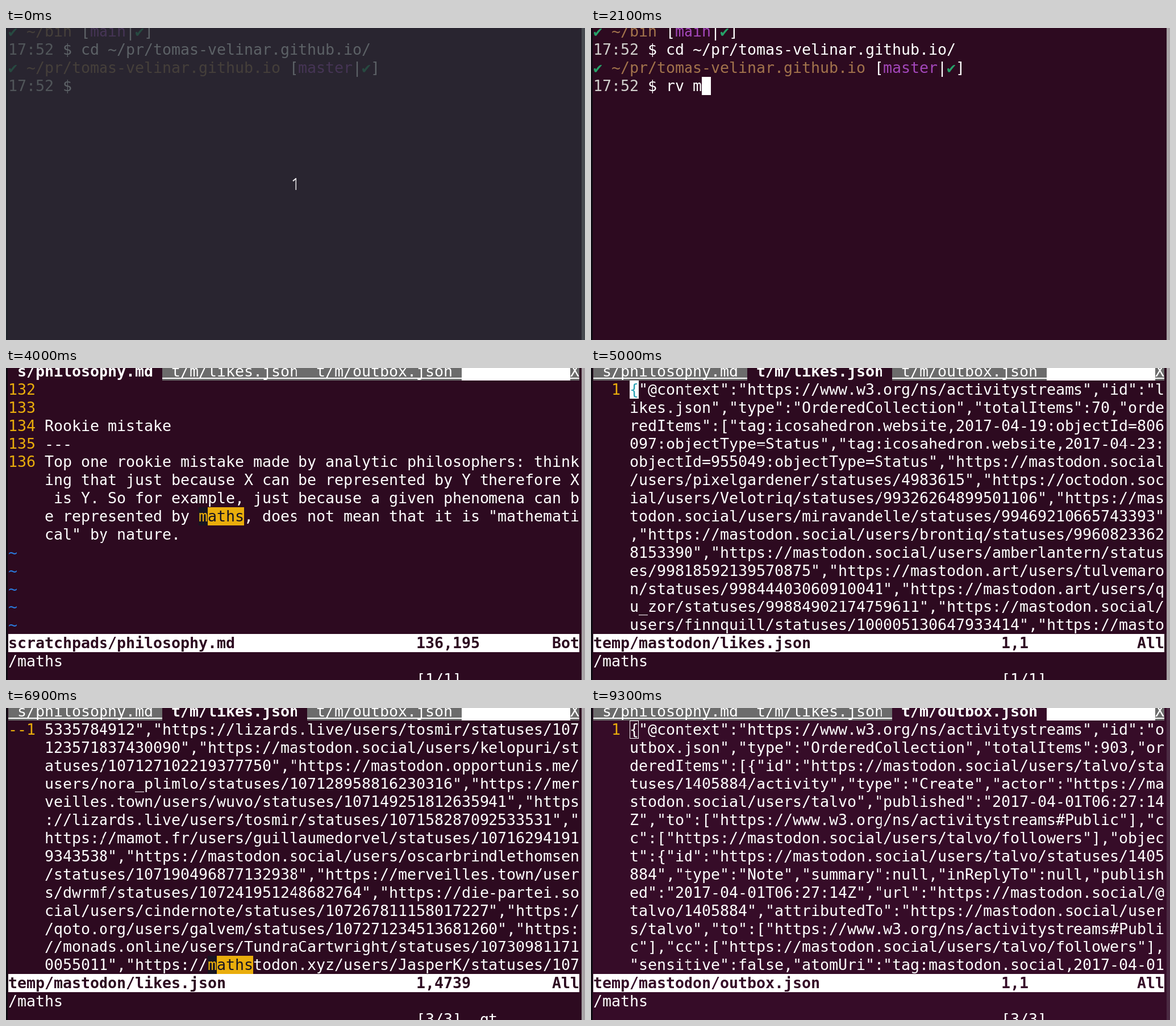
These frames come from a looping animation (1019 by 549 pixels, 9400 ms). An HTML page with a canvas:

```html
<!DOCTYPE html>
<html lang="en">
<head>
<meta charset="utf-8">
<title>Terminal search</title>
<style>
  html, body { margin: 0; width: 100%; height: 100%; overflow: hidden; background: #2d0a20; }
  canvas { display: block; width: 1019px; height: 549px; image-rendering: pixelated; }
</style>
</head>
<body>
<canvas id="screen" width="1022" height="551"></canvas>
<script>
const LOOP = 9400;
// Cell grid of the terminal; the page shows it slightly scaled down
const CELL_W = 16, CELL_H = 32, LEFT = 4, TOP = -10, BASELINE = 25, WRAP = 59;
const FONT = '26.667px "DejaVu Sans Mono", "DejaVu Sans", monospace';

const focused = { bg: "#2d0a20", bar: "#a8a3a6" };
const unfocused = { bg: "#360c28", bar: "#4a2a42" };

// A style without fg takes the background colour for its text
const styles = {
  text: { fg: "#fff" },
  time: { fg: "#d0cfcc" },
  path: { fg: "#a2734c" },
  branch: { fg: "#a347ba" },
  ok: { fg: "#26a269" },
  num: { fg: "#e9ad0c" },
  tilde: { fg: "#2a7bde" },
  hit: { fg: "#171421", bg: "#e9ad0c" },
  hitCursor: { fg: "#e9ad0c", bg: "#171421" },
  cursor: { bg: "#fff" },
  brace: { fg: "#2aa1b3", bg: "#fff" },
  hollow: { fg: "#fff", box: true },
  active: { fg: "#fff", bold: true },
  tab: { fg: "#fff", bg: "#6c6c6c", underline: true },
  fill: { bg: "#fff" },
  status: { bg: "#fff", bold: true },
};

// A screen is a list of rows; a row is a list of plain strings and [style, text] pairs
const lines = text => text.trim().split("\n");

// Shell
const site = "~/pr/tomas-velinar.github.io";
const cursor = ["cursor", " "];
const prompt = (path, branch) =>
  [["ok", "✔"], " ", ["path", path], " [", ["branch", branch], "|", ["ok", "✔"], "]"];
const command = (...parts) => [["time", "17:52"], " $ ", ...parts];
const shell = (...parts) =>
  [prompt("~/bin", "main"), command(`cd ${site}/`), prompt(site, "master"), command(...parts)];

// Editor
const tabs = ["s/philosophy.md", "t/m/likes.json", "t/m/outbox.json"];
const files = ["scratchpads/philosophy.md", "temp/mastodon/likes.json", "temp/mastodon/outbox.json"];

function editor(file, body, pos, footer, search = "/maths") {
  const bar = tabs.map((name, i) => [i === file ? "active" : "tab", ` ${name} `]);
  const status = files[file].padEnd(45) + pos.padEnd(15) + (file ? "All" : "Bot");
  return [
    [...bar, ["fill", " ".repeat(12)], ["tab", "X"]], ...body,
    [["status", status]], [search], [" ".repeat(45) + footer],
  ];
}

const gutter = (label, ...parts) => [["num", label], " ", ...parts];

function mark(text, current) {
  const match = current ? [["hitCursor", "m"], ["hit", "aths"]] : [["hit", "maths"]];
  return text.split("maths").flatMap((part, i) => i ? [...match, part] : [part]);
}

const json = (rows, label, current) =>
  rows.map((r, i) => gutter(i ? "   " : label, ...mark(r, i === current)));

// Top of a file, with the cursor on its first character
const fileTop = (rows, style) => rows.map((r, i) =>
  i ? gutter("   ", r) : gutter("  1", [style, r[0]], r.slice(1)));

const note = lines(`
Top one rookie mistake made by analytic philosophers: think
ing that just because X can be represented by Y therefore X
 is Y. So for example, just because a given phenomena can b
e represented by maths, does not mean that it is "mathemati
cal" by nature.`);

function philosophy(found) {
  const text = note.map((t, i) => {
    if (found) return mark(t, true);
    return i ? [t] : [["cursor", t[0]], t.slice(1)];
  });
  return [
    gutter("132"), gutter("133"), gutter("134", "Rookie mistake"), gutter("135", "---"),
    ...text.map((parts, i) => gutter(i ? "   " : "136", ...parts)),
    ...Array(5).fill([["tilde", "~"]]),
  ];
}

const likesTop = lines(`
{"@context":"https://www.w3.org/ns/activitystreams","id":"l
ikes.json","type":"OrderedCollection","totalItems":70,"orde
redItems":["tag:icosahedron.website,2017-04-19:objectId=806
097:objectType=Status","tag:icosahedron.website,2017-04-23:
objectId=955049:objectType=Status","https://mastodon.social
/users/pixelgardener/statuses/4983615","https://octodon.soc
ial/users/Velotriq/statuses/99326264899501106","https://mas
todon.social/users/miravandelle/statuses/99469210665743393"
,"https://mastodon.social/users/brontiq/statuses/9960823362
8153390","https://mastodon.social/users/amberlantern/status
es/99818592139570875","https://mastodon.art/users/tulvemaro
n/statuses/99844403060910041","https://mastodon.art/users/q
u_zor/statuses/99884902174759611","https://mastodon.social/
users/finnquill/statuses/100005130647933414","https://masto`);

const likesMid = lines(`
ttps://piggo.space/objects/ae0387e2-7f1d-4922-a147-f49c6596
2530","https://mathstodon.xyz/users/BrunoTavish/statuses/10
5204619456993276","https://merveilles.town/users/oulivane/s
tatuses/105567436515174204","https://mastodon.art/users/Cyn
dovar/statuses/105803146321920708","https://merveilles.town
/users/morvenix/statuses/106116504560615213","https://ioc.e
xchange/users/dorvik/statuses/106562531009340054","https://
snabelen.no/users/pelto/statuses/106686575249177634","https
://merveilles.town/users/wuvo/statuses/106692930725647244",
"https://snabelen.no/users/pelto/statuses/10672007986868348
7","https://merveilles.town/users/jendorim/statuses/1068319
98079843077","https://monads.online/users/ferdinandkolvar/s
tatuses/106993542835199282","https://lizards.live/users/tos
mir/statuses/107021786010270525","https://mathstodon.xyz/us`);

const likesEnd = lines(`
5335784912","https://lizards.live/users/tosmir/statuses/107
123571837430090","https://mastodon.social/users/kelopuri/st
atuses/107127102219377750","https://mastodon.opportunis.me/
users/nora_plimlo/statuses/107128958816230316","https://mer
veilles.town/users/wuvo/statuses/107149251812635941","https
://lizards.live/users/tosmir/statuses/107158287092533531","
https://mamot.fr/users/guillaumedorvel/statuses/10716294191
9343538","https://mastodon.social/users/oscarbrindlethomsen
/statuses/107190496877132938","https://merveilles.town/user
s/dwrmf/statuses/107241951248682764","https://die-partei.so
cial/users/cindernote/statuses/107267811158017227","https:/
/qoto.org/users/galvem/statuses/107271234513681260","https:
//monads.online/users/TundraCartwright/statuses/10730981171
0055011","https://mathstodon.xyz/users/JasperK/statuses/107`);

const outbox = lines(`
{"@context":"https://www.w3.org/ns/activitystreams","id":"o
utbox.json","type":"OrderedCollection","totalItems":903,"or
deredItems":[{"id":"https://mastodon.social/users/talvo/sta
tuses/1405884/activity","type":"Create","actor":"https://ma
stodon.social/users/talvo","published":"2017-04-01T06:27:14
Z","to":["https://www.w3.org/ns/activitystreams#Public"],"c
c":["https://mastodon.social/users/talvo/followers"],"objec
t":{"id":"https://mastodon.social/users/talvo/statuses/1405
884","type":"Note","summary":null,"inReplyTo":null,"publish
ed":"2017-04-01T06:27:14Z","url":"https://mastodon.social/@
talvo/1405884","attributedTo":"https://mastodon.social/user
s/talvo","to":["https://www.w3.org/ns/activitystreams#Publi
c"],"cc":["https://mastodon.social/users/talvo/followers"],
"sensitive":false,"atomUri":"tag:mastodon.social,2017-04-01`);

// The stretch of likes that ends at the first match
function likesBefore() {
  let seed = 4211;
  const rand = n => (seed = seed * 16807 % 2147483647) % n;
  const pick = list => list[rand(list.length)];
  const digits = n => Array.from({ length: n }, () => rand(10)).join("");
  const hosts = ["mastodon.social", "octodon.social", "merveilles.town", "mastodon.art"];
  const users = ["pixelgardener", "oulivane", "finnquill", "wuvo", "amberlantern", "jendorim"];
  let text = "";
  for (let i = 0; i < 14; i++) {
    text += `"https://${pick(hosts)}/users/${pick(users)}/statuses/10${1 + (i >> 2)}${digits(15)}",`;
  }
  text = (text + '"h').slice(-12 * WRAP);
  const rows = Array.from({ length: 12 }, (_, i) => text.slice(i * WRAP, (i + 1) * WRAP));
  return [...rows, likesMid[0], likesMid[1]];
}

// Timeline: start in ms, screen, options
const typed = "rv maths";
const keys = [1100, 1400, 1700, 2100, 2200, 2500, 2600, 2800];
const found = philosophy(true);
const last = json(likesEnd, "--1", 13);
const scenes = [
  [0, shell(), { countdown: "1" }],
  [100, shell()],
  [600, shell(cursor)],
  ...keys.map((t, i) => [t, shell(typed.slice(0, i + 1), cursor)]),
  [3200, [...shell(typed), [cursor]]],
  [3300, [[cursor]]],
  [3400, editor(0, philosophy(false), "136,1", "", "")],
  [4000, editor(0, found, "136,195", "[1/1]")],
  [4900, editor(0, found, "136,195", "[1/1]  g")],
  [5000, editor(1, fileTop(likesTop, "brace"), "1,1", "[1/1]")],
  [5400, editor(1, json(likesBefore(), "--1", 13), "1,2848", "[1/3]")],
  [5900, editor(1, json(likesMid, "--1", 13), "1,3583", "[2/3]")],
  [6500, editor(1, last, "1,4739", "[3/3]")],
  [6800, editor(1, last, "1,4739", "[3/3]  g")],
  [6900, editor(1, last, "1,4739", "[3/3]  gt")],
  [7600, editor(2, fileTop(outbox, "cursor"), "1,1", "[3/3]")],
  [9300, editor(2, fileTop(outbox, "hollow"), "1,1", "[3/3]"), { theme: unfocused }],
];

// Drawing
const canvas = document.getElementById("screen");
const ctx = canvas.getContext("2d");

function rect(color, x, y, w, h) {
  ctx.fillStyle = color;
  ctx.fillRect(x, y, w, h);
}

function drawRun(name, text, x, y, theme) {
  const style = styles[name], width = text.length * CELL_W;
  const fg = style.fg || theme.bg;
  if (style.bg) rect(style.bg, x, y, width, CELL_H);
  if (style.underline) rect(fg, x, y + BASELINE + 2, width, 2);
  if (style.box) {
    ctx.strokeStyle = fg;
    ctx.strokeRect(x + .5, y + .5, width - 1, CELL_H - 1);
  }
  ctx.font = (style.bold ? "bold " : "") + FONT;
  ctx.fillStyle = fg;
  [...text].forEach((ch, i) => ctx.fillText(ch, x + i * CELL_W, y + BASELINE));
}

function drawScreen(rows, { theme = focused, countdown } = {}) {
  const { width, height } = canvas;
  rect(theme.bg, 0, 0, width, height);
  rect("#0e0a12", 0, 0, 3, height);
  rect(theme.bar, width - 6, 0, 6, height);
  ctx.textAlign = "left";
  rows.forEach((row, r) => {
    let x = LEFT;
    for (const part of row) {
      const [name, text] = typeof part === "string" ? ["text", part] : part;
      drawRun(name, text, x, TOP + r * CELL_H, theme);
      x += text.length * CELL_W;
    }
  });
  if (countdown) {
    rect("rgba(40, 47, 53, .757)", 0, 0, width, height);
    ctx.font = '29px "Noto Sans", sans-serif';
    ctx.textAlign = "center";
    ctx.fillStyle = "#eceaec";
    ctx.fillText(countdown, width / 2, 286);
  }
}

let shown = null;

function tick() {
  const t = performance.now() % LOOP;
  const scene = scenes.findLast(([start]) => start <= t);
  if (scene !== shown) {
    shown = scene;
    drawScreen(scene[1], scene[2]);
  }
  requestAnimationFrame(tick);
}
tick();
</script>
</body>
</html>
```
